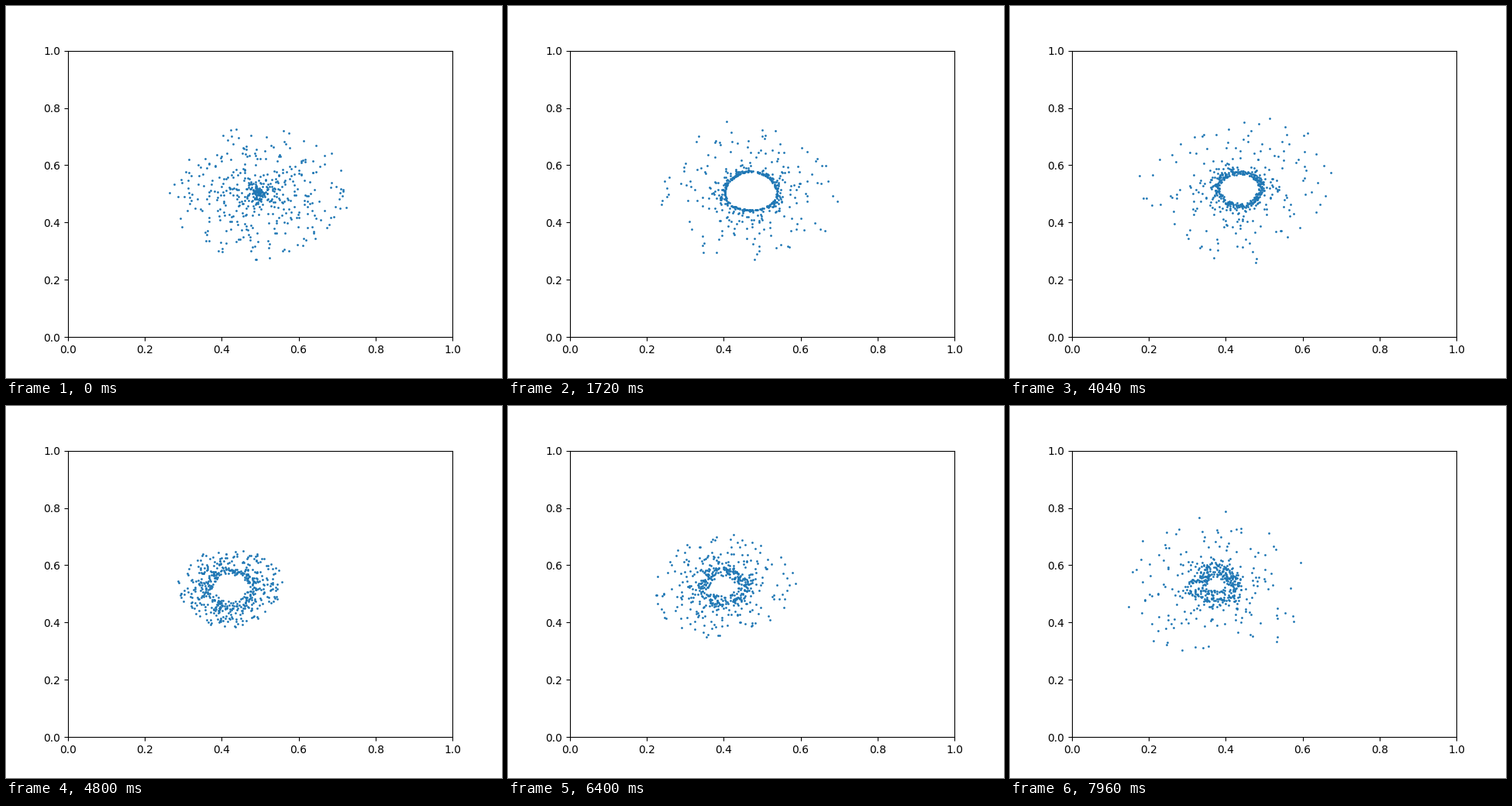
Animation, 640 px wide and 480 px high, one loop 8000 ms. Source, as a matplotlib script:

```python
import matplotlib.pyplot as plt
import numpy as np
from matplotlib.animation import FuncAnimation

COUNT = 500
FRAMES = 200
INTERVAL = 40
PERIOD = 1.95    # seconds per breath of the swarm
RING_TIME = 1.7  # seconds until the ring has opened

rng = np.random.default_rng(7)
phase = rng.uniform(0, 2, COUNT)
rate = rng.uniform(-0.15, 0.15, COUNT)
angle = rng.uniform(0, 2 * np.pi, COUNT)
spin = rng.normal(0, 0.1, COUNT)
fuzz = rng.random(COUNT)


def smoothstep(s):
    s = min(max(s, 0), 1)
    return s * s * (3 - 2 * s)


def radii(t):
    """Distances from the centre: a hollow ring with a breathing fringe."""
    opened = smoothstep(t / RING_TIME)
    breath = np.cos(2 * np.pi * t / PERIOD)
    hole = 0.078 * opened * (1 - t / 11)
    edge = 0.2 + (0.035 + 0.03 * opened) * breath
    power = 1.3 + (2.1 + 1.5 * breath) * opened

    # Ranks bounce between 0 and 1, so they always stay evenly spread.
    rank = np.abs((phase + rate * t) % 2 - 1)
    blur = 0.001 * t * t * fuzz * (1 - rank)
    return hole + (edge - hole) * rank ** power + blur


def positions(t):
    a = angle + spin * t
    r = radii(t) * (1 + 0.03 * smoothstep(t) * np.cos(3 * a + t))
    cx = 0.497 - 0.0155 * t
    cy = 0.502 + 0.004 * t
    return cx + r * np.cos(a), cy + r * np.sin(a)


fig, ax = plt.subplots(figsize=(6.4, 4.8), dpi=100)
ax.set_xlim(0, 1)
ax.set_ylim(0, 1)
dots, = ax.plot([], [], "o", color="C0", markersize=1)


def update(frame):
    dots.set_data(*positions(frame * INTERVAL / 1000))
    return dots,


anim = FuncAnimation(fig, update, frames=FRAMES, interval=INTERVAL,
                     init_func=lambda: update(0), repeat=True, repeat_delay=0)
plt.show()
```
